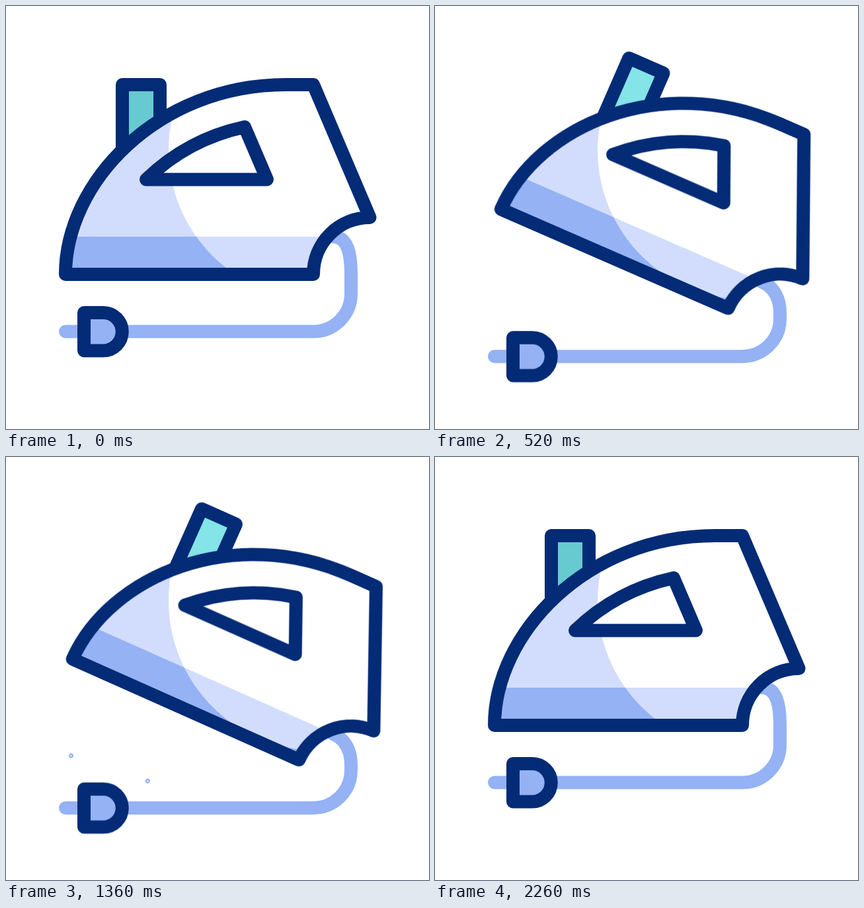
An HTML page for the animation above (2.4 s loop, 640x640 px).

```html
<!DOCTYPE html>
<html lang="en">
<head>
<meta charset="utf-8">
<title>Iron</title>
<style>
  html, body { margin: 0; width: 100%; height: 100%; overflow: hidden; background: #fff; }
  svg { display: block; width: 100vw; height: 100vh; }

  :root { --ease: cubic-bezier(.333, 0, .667, 1); }
  .line { fill: none; stroke: #042b76; stroke-width: 20; stroke-linejoin: round; }
  .soft { fill: none; stroke: #94b2f4; stroke-width: 20; stroke-linecap: round; }

  .shade { --tank: #67cad0; --body: #d2ddfd; --band: #94b2f4; }
  .light { --tank: #84e4e8; --body: #fff; --band: #d2ddfd; }
  .tank { fill: var(--tank); }
  .body { fill: var(--body); }
  .band { fill: var(--band); }

  .iron { transform-origin: 487px 337px; animation: tilt 2400ms var(--ease) infinite; }
  .plug { animation: drop 2400ms var(--ease) infinite; }
  .cable { animation: bend 2400ms var(--ease) infinite; }
  .puff { scale: 0; animation: pop 2400ms var(--ease) infinite, drift 2400ms linear infinite; }

  @keyframes tilt {
    0%, 93.056%, 100% { transform: translate(0, 0) rotate(0deg); }
    23.611%, 69.444% { transform: translate(4.4px, 67.2px) rotate(24deg); }
  }
  @keyframes drop {
    0%, 93.056%, 100% { transform: translateY(0); }
    23.611%, 69.444% { transform: translateY(38.4px); }
  }
  @keyframes bend {
    0%, 93.056%, 100% {
      d: path("M90 492.5 L465 492.5 C496.5 492.5 522 467 522 435.5 L522 405 C522 375 517 349 495 349");
    }
    23.611%, 69.444% {
      d: path("M90 530.9 L465 530.9 C496.5 530.9 522 505.4 522 473.9 L522 466 C522 445 514.3 427 494 418.5");
    }
  }
  @keyframes pop {
    0%, 23.611% { scale: 0; }
    33.333%, 45.833% { scale: 1; }
    59.722%, 100% { scale: 0; }
  }
  @keyframes drift {
    0%, 23.611% { translate: var(--from); }
    59.722%, 100% { translate: var(--to); }
  }
</style>
</head>
<body>
<svg viewBox="0 0 640 640">
  <defs>
    <path id="shell" d="M90 406 H465 A85.5 86 0 0 1 550.5 320 L465 119 H424 C228 119 90 268 90 406 Z"/>
    <clipPath id="inShell"><use href="#shell"/></clipPath>
    <clipPath id="glow"><circle cx="472" cy="218" r="226"/></clipPath>
    <g id="fills">
      <path class="tank" d="M176 216 V119 H233 V172 Z"/>
      <use href="#shell" class="body"/>
      <rect class="band" x="80" y="349" width="480" height="57" clip-path="url(#inShell)"/>
    </g>
  </defs>

  <path class="soft cable" d="M90 492.5 L465 492.5 C496.5 492.5 522 467 522 435.5 L522 405 C522 375 517 349 495 349"/>
  <path class="line plug" style="fill:#94b2f4" d="M118 464 H147 A28.75 28.75 0 0 1 147 521.5 H118 Z"/>

  <g class="puff" style="--from:141.7px 399.6px; --to:94.6px 456.8px">
    <ellipse class="soft" rx="17.5" ry="20.5" transform="rotate(24)"/>
  </g>
  <g class="puff" style="--from:215.6px 437.6px; --to:214.2px 494.8px">
    <ellipse class="soft" rx="18.5" ry="20.5" transform="rotate(40)"/>
  </g>

  <!-- The highlight stays still while the iron tilts beneath it -->
  <g class="iron shade"><use href="#fills"/></g>
  <g clip-path="url(#glow)"><g class="iron light"><use href="#fills"/></g></g>

  <g class="iron">
    <path class="line" d="M176 216 V119 H233 V172"/>
    <use href="#shell" class="line"/>
    <path class="line" style="fill:#fff" d="M212 262.5 H395 L361 183 C310 194 258 218 212 262.5 Z"/>
  </g>
</svg>
</body>
</html>
```
